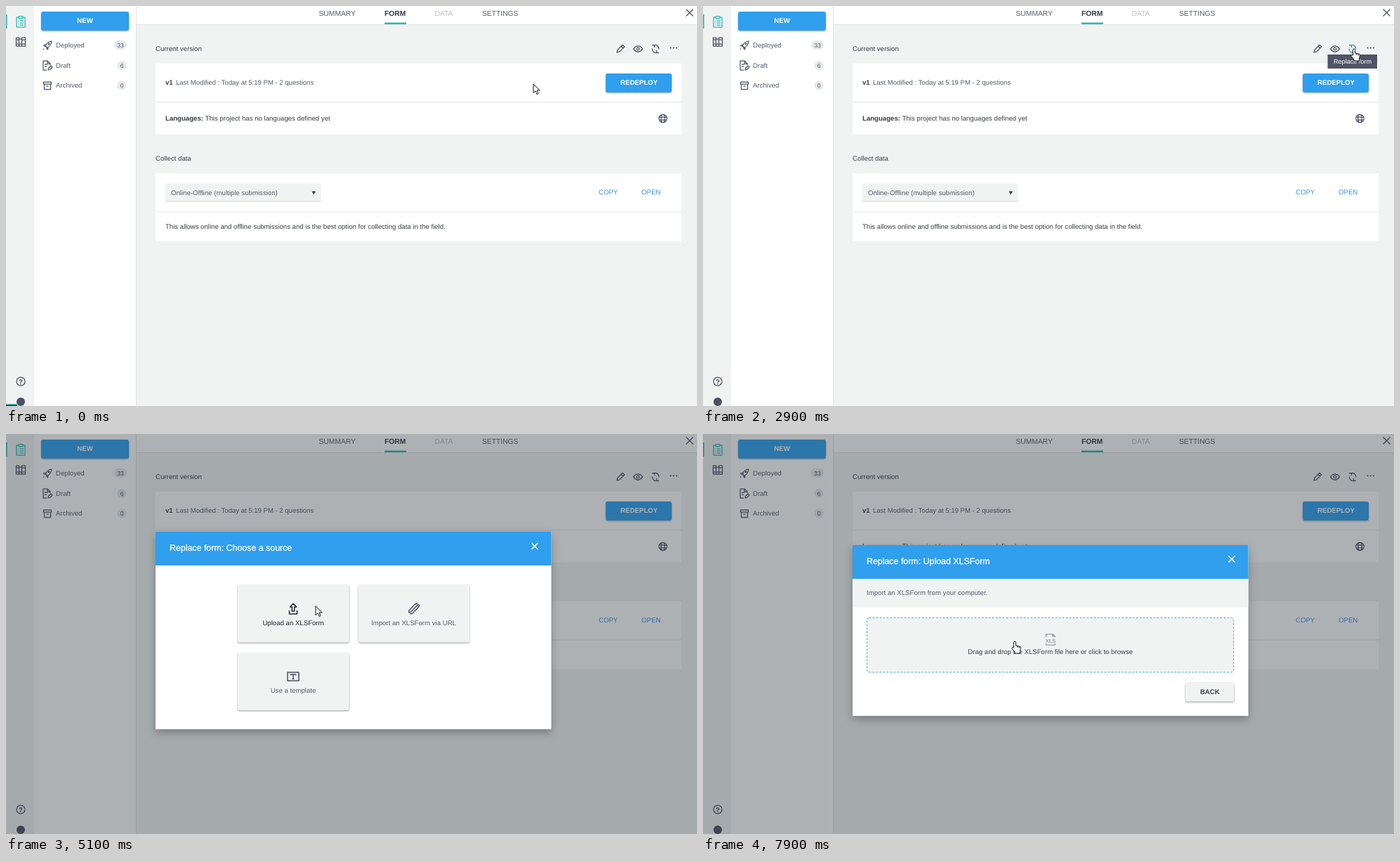
An HTML page for the animation above (8 s loop, 984 px wide and 569 px high).

```html
<!DOCTYPE html>
<html lang="en">
<head>
<meta charset="utf-8">
<title>Replace form</title>
<style>
html, body { margin: 0; width: 100%; height: 100%; overflow: hidden; background: #f1f3f3 }
svg { display: block; font: 9.65px "Liberation Sans", Arial, sans-serif; text-rendering: geometricPrecision; fill: #383d48 }
.icon { fill: none; stroke: #4b5163; stroke-width: 1.25; stroke-linejoin: round }
.soft { fill: #565c6b }
.tab { font-size: 10.3px; fill: #565c6b }
.bold { font-weight: bold }
.mid { text-anchor: middle }
.white { fill: #fff }
.blue { fill: #2f9fee }
.link { fill: #3a8fd6 }
.teal { fill: #2fb7b2 }
.title { font-size: 12.4px; fill: #fff; stroke: #fff; stroke-width: .25 }
.badge { fill: #e5e8ea }
.count { font-size: 8.5px; fill: #565c6b; text-anchor: middle }
.card { fill: #f1f3f3; filter: drop-shadow(0 1px 1.2px #0006) }
.button { fill: #2f9fee; filter: drop-shadow(0 1px 1.2px #0005) }
.modal { filter: drop-shadow(0 5px 6px #0004) }
.hover rect { fill: #e5e9e9 }
.dark text { fill: #20242c }
.dark .icon { stroke: #20242c }
#ripple { mix-blend-mode: multiply; fill: #c9a48f }
</style>
</head>
<body>
<svg width="984" height="569" viewBox="0 0 984 569">
  <rect width="984" height="569" fill="#f1f3f3"/>
  <rect x="40" width="145" height="569" class="white"/>
  <rect x="185.5" width="799" height="26" class="white"/>
  <path d="M185.500 0V569M185 26.500H984" stroke="#e2e5e7" fill="none"/>

  <!-- icon rail -->
  <rect y="12" width="1.600" height="20" class="teal"/>
  <g class="icon" style="stroke:#2fb7b2">
    <path d="M18 16H15V30H27V16H24M18 14.500H24V17.500H18ZM19.500 21H25M19.500 24H25M19.500 27H25M17 21H18M17 24H18M17 27H18"/>
  </g>
  <path class="icon" d="M14.500 45H18.500V57H14.500ZM18.500 47H22.500V57H18.500ZM22.500 45H27.500V57H22.500ZM14.500 54H27.500M14.500 48H18.500M22.500 48H27.500"/>
  <circle class="icon" cx="21" cy="534" r="6"/>
  <text x="21" y="537.500" class="mid bold">?</text>
  <circle cx="21" cy="563" r="6" fill="#4b5163"/>
  <g id="status"><rect y="566" width="16" height="1.500" class="teal"/><rect y="567.500" width="16" height="1.500" fill="#222"/></g>

  <!-- sidebar -->
  <rect class="button" x="50" y="8" width="125" height="27" rx="3"/>
  <text x="112.500" y="24.300" class="mid bold white">NEW</text>
  <g class="icon">
    <path d="M56.500 57Q58 51 65 50Q64 57 58.500 59.500ZM57 55L53.500 56L56 58M60 59L59.500 62L57.500 59.500M54 60.500L53 62"/>
    <circle cx="61" cy="54" r=".8"/>
    <path d="M63 84V82L59 78H53V91H58M59 78V82H63M55 83H59M55 86H58M60 91L60.500 88.500L64 85L66 87L62.500 90.500Z"/>
    <path d="M53.500 108H64.500V111H53.500ZM54.500 111V118.500H63.500V111M57.500 114H60.500"/>
  </g>
  <g class="soft">
    <text x="71" y="59">Deployed</text><text x="71" y="88">Draft</text><text x="71" y="116">Archived</text>
  </g>
  <rect class="badge" x="154" y="49" width="18" height="13" rx="6.500"/>
  <circle class="badge" cx="165" cy="84.500" r="6.500"/><circle class="badge" cx="165" cy="113" r="6.500"/>
  <text class="count" x="163" y="58.500">33</text><text class="count" x="165" y="87.500">6</text><text class="count" x="165" y="116">0</text>

  <!-- tabs -->
  <text class="tab" x="445.500" y="13.700">SUMMARY</text>
  <text class="tab bold" x="539" y="13.700" style="fill:#333846">FORM</text>
  <text class="tab" x="610.500" y="13.700" style="fill:#b9bdc3">DATA</text>
  <text class="tab" x="678" y="13.700">SETTINGS</text>
  <rect class="teal" x="539" y="23.500" width="31" height="2.500"/>
  <path class="icon" d="M968.500 4.500L978.500 14.500M978.500 4.500L968.500 14.500"/>

  <!-- form page -->
  <text x="213" y="64">Current version</text>
  <g class="icon">
    <path d="M870 66L870.800 62.500L878 55.300L880.700 58L873.500 65.200ZM876 57.300L878.700 60"/>
    <path d="M893.500 61Q900 52.500 906.500 61Q900 69.500 893.500 61Z"/><circle cx="900" cy="61" r="1.800"/>
    <path id="swap" d="M922 56Q928.500 53.500 930 61.500M920 55.500H923.500V59M928 66Q921.500 68.500 920 60.500M930 66.500H926.500V63"/>
  </g>
  <g fill="#4b5163"><circle cx="946.500" cy="59.500" r="1.100"/><circle cx="950.700" cy="59.500" r="1.100"/><circle cx="954.900" cy="59.500" r="1.100"/></g>
  <rect x="213" y="82" width="749" height="100.500" class="white"/>
  <rect x="213" y="136" width="749" height="1.500" fill="#eceeef"/>
  <text x="227" y="112" class="bold">v1</text>
  <text x="242" y="112" class="soft" style="font-size:9.550px">Last Modified : Today at 5:19 PM - 2 questions</text>
  <rect class="button" x="854" y="96" width="94" height="27" rx="3"/>
  <text x="901.500" y="112" class="mid bold white">REDEPLOY</text>
  <text x="227" y="163"><tspan class="bold">Languages:</tspan> This project has no languages defined yet</text>
  <g class="icon"><circle cx="935.500" cy="160" r="5.700"/><ellipse cx="935.500" cy="160" rx="2.600" ry="5.700"/><path d="M930.500 158H940.500M930.500 162H940.500"/></g>

  <text x="213" y="220">Collect data</text>
  <rect x="213" y="238" width="749" height="96.500" class="white"/>
  <rect x="213" y="292" width="749" height="1.500" fill="#eceeef"/>
  <rect x="226.500" y="252.500" width="222" height="25.500" fill="#f1f3f3"/>
  <rect x="226.500" y="277.500" width="222" height="1" fill="#d5d8da"/>
  <text x="235" y="268.500" class="soft">Online-Offline (multiple submission)</text>
  <path d="M435.500 263.500H441L438.200 268.500Z"/>
  <text x="844" y="268" class="link">COPY</text><text x="905" y="268" class="link">OPEN</text>
  <text x="227" y="317" style="font-size:9.600px">This allows online and offline submissions and is the best option for collecting data in the field.</text>

  <g id="tip">
    <rect x="889.500" y="69" width="70.500" height="20" fill="#4f5566"/>
    <text x="925" y="82" class="mid white" style="font-size:9.100px">Replace form</text>
  </g>

  <rect id="shade" width="984" height="569" fill="rgb(40,50,60)" opacity=".38"/>

  <!-- source chooser -->
  <g id="choose">
    <g class="modal"><rect x="213" y="139" width="563.500" height="281" class="white"/><rect x="213" y="139" width="563.500" height="48" class="blue"/></g>
    <text class="title" x="233" y="166">Replace form: Choose a source</text>
    <path d="M748.500 155L757.500 164M757.500 155L748.500 164" stroke="#fff" stroke-width="1.600"/>
    <g id="upload">
      <rect class="card" x="330" y="214.500" width="158.500" height="82" rx="3"/>
      <path class="icon" style="stroke-width:1.500" d="M407.300 252V246H404.500L409 241.300L413.500 246H410.700V252ZM403.500 251V256H414.500V251"/>
      <text x="409" y="272" class="mid soft">Upload an XLSForm</text>
    </g>
    <rect class="card" x="502" y="214.500" width="158" height="82" rx="3"/>
    <path class="icon" style="stroke-width:1.500" d="M573.500 251.500L582 242.500Q584 241 586 241.500M573.500 251.500Q573 253.500 575 254.500L579 250.500M588 245.500L579.500 254.500Q577.500 256.500 575.500 256M588 245.500Q589 243.500 587 242.500L583 246.500M578 251.500L584 245.500"/>
    <text x="580.500" y="272" class="mid soft">Import an XLSForm via URL</text>
    <rect class="card" x="330" y="311" width="158.500" height="82" rx="3"/>
    <path class="icon" style="stroke-width:1.500" d="M401 339H417V351H401ZM405.500 343.500V342H412.500V343.500M409 342V348.500M407.500 348.500H410.500"/>
    <text x="409" y="368" class="mid soft">Use a template</text>
  </g>

  <!-- file upload -->
  <g id="file">
    <g class="modal"><rect x="213" y="158" width="563.500" height="243" class="white"/><rect x="213" y="158" width="563.500" height="48" class="blue"/></g>
    <text class="title" x="233" y="184.700">Replace form: Upload XLSForm</text>
    <path d="M748.500 173.500L757.500 182.500M757.500 173.500L748.500 182.500" stroke="#fff" stroke-width="1.600"/>
    <rect x="213" y="206" width="563.500" height="40.500" fill="#f1f3f3"/>
    <text x="233" y="229.300" class="soft">Import an XLSForm from your computer.</text>
    <rect id="drop" x="233.500" y="261.500" width="522" height="77.500" rx="3" fill="#f1f3f3" stroke-dasharray="3 2"/>
    <path class="icon" style="stroke:#979ba0" d="M488.500 289V284.500H498L501.500 288V289M498 284.500V288H501.500M488.500 298V300H501.500V298"/>
    <text x="495" y="297" class="mid bold" style="font-size:7.500px;fill:#979ba0">XLS</text>
    <text x="494.700" y="313" class="mid">Drag and drop the XLSForm file here or click to browse</text>
    <rect class="card" x="687" y="353.500" width="69.500" height="27" rx="3"/>
    <text x="721.800" y="370.300" class="mid bold">BACK</text>
  </g>

  <g id="ripple"><circle id="outer"/><circle id="inner"/></g>
  <g id="cursor" fill="#fff" stroke="#111" stroke-linejoin="round">
    <path id="arrow" d="M0 0V12.500L3 9.800L5 14.500L7 13.600L5 9H9.200Z"/>
    <path id="hand" d="M-1.500 9V1.300Q-1.500 0 0 0T1.500 1.300V6L7 7.200Q8.600 7.600 8.500 9.300L7.500 14V17H0V15L-4 10.500Q-4.600 9 -3 8.700ZM4 7V9M6.500 7.500V9.500"/>
  </g>
</svg>
<script>
const $ = id => document.getElementById(id);
const show = (id, on) => $(id).style.display = on ? "" : "none";
const set = (id, attrs) => { for (const k in attrs) $(id).setAttribute(k, attrs[k]); };

// time, x, y of the pointer tip
const path = [
  [0, 751, 111], [100, 750, 111], [500, 750, 111], [700, 928, 79], [800, 928, 79],
  [900, 939, 79], [1000, 939, 79], [1500, 931, 47], [1900, 927, 61], [4400, 927, 61],
  [5100, 441, 245], [6300, 441, 245], [6600, 443, 296], [6900, 444, 295], [8000, 444, 295]
];

function pointer(t) {
  const i = path.findIndex(p => p[0] > t);
  const [a, x, y] = path[i - 1], [b, u, v] = path[i];
  const k = (t - a) / (b - a);
  return [x + (u - x) * k, y + (v - y) * k];
}

function ripple(t) {
  let x = 929.5, y = 62, r = 0, inner = 0, alpha = 0;
  if (t >= 2000 && t < 2900) {
    r = 27 * (1 - (1 - (t - 1900) / 1000) ** 7);
    inner = r * .6;
    alpha = t < 2400 ? 1 : (2900 - t) / 600;
  }
  for (const [start, cy] of [[5500, 249], [7600, 295]]) {
    const k = (t - start) / 300;
    if (k >= 0 && k < 1) [x, y, r, inner, alpha] = [444.5, cy, 30 + 66 * k, 0, .6 * (1 - k)];
  }
  set("outer", { cx: x, cy: y, r, opacity: .28 * alpha });
  set("inner", { cx: x, cy: y, r: inner, opacity: .3 * alpha });
}

function draw(now) {
  const t = Math.floor(now % 8000 / 100) * 100;
  const [x, y] = pointer(t);
  const hover = t >= 1400 && t < 4000;
  const hand = t >= 1400 && t < 3000 || t >= 6500;
  set("cursor", { transform: `translate(${x} ${y})` });
  show("hand", hand);
  show("arrow", !hand);
  show("tip", hover);
  $("swap").style.stroke = hover ? "#3a8fd6" : "";
  show("status", t < 2900);
  show("shade", t >= 4000);
  show("choose", t >= 4000 && t < 6000);
  show("file", t >= 6000);
  set("upload", { class: (t >= 5100 ? "dark " : "") + (t >= 5500 ? "hover" : "") });
  set("drop", { stroke: t >= 6500 ? "#45b3d6" : "#9aa4b0" });
  ripple(t);
  requestAnimationFrame(draw);
}
requestAnimationFrame(draw);
</script>
</body>
</html>
```
